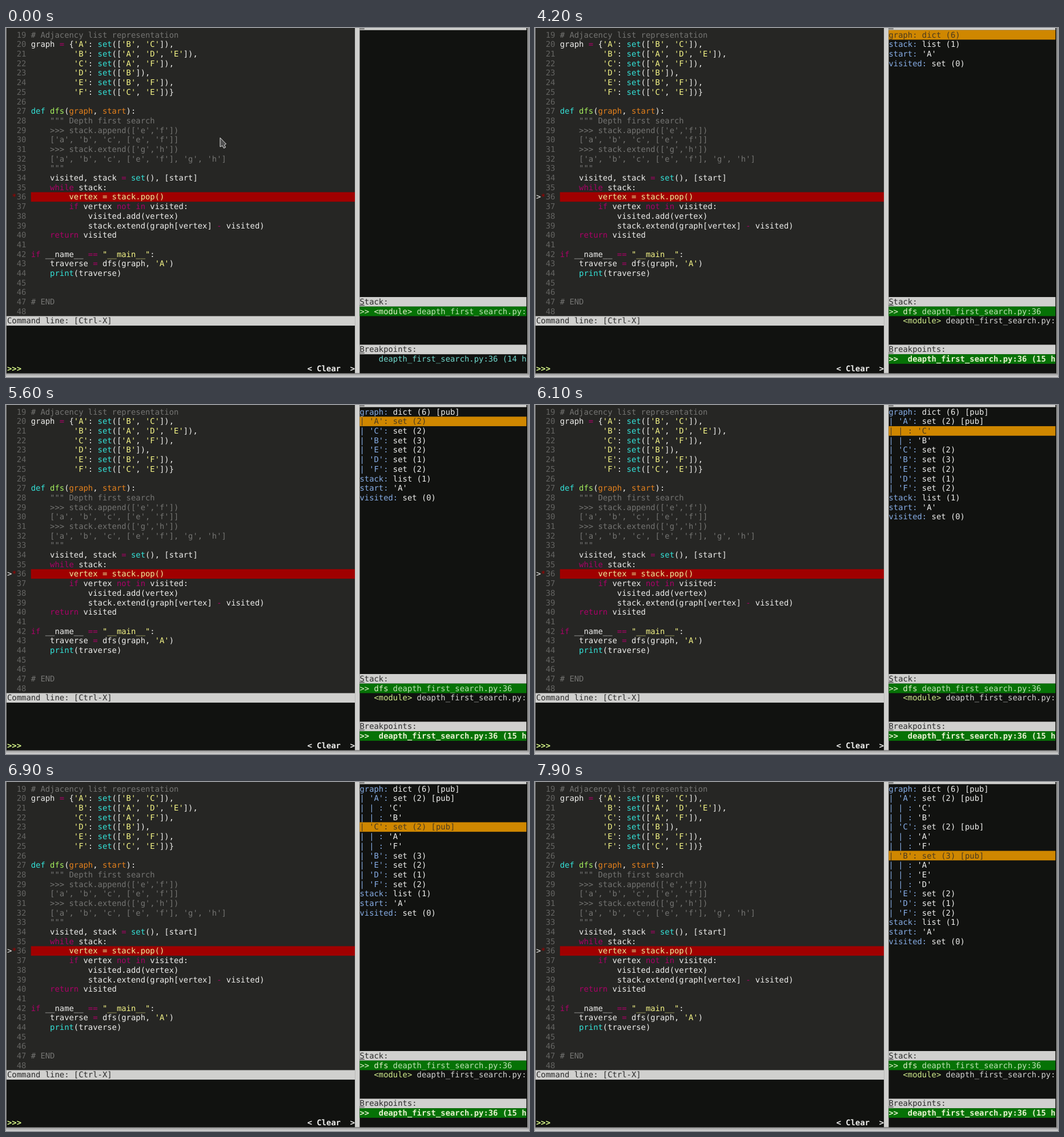
These frames come from a looping animation (916x611 px, 8000 ms). An HTML page:

```html
<!DOCTYPE html>
<html lang="en">
<head>
<meta charset="utf-8">
<title>Debugger session</title>
<style>
  html, body { margin: 0; width: 100%; height: 100%; overflow: hidden; background: #111210; }
  svg { display: block; width: 916px; height: 611px; }
  text {
    font: 13.86px "DejaVu Sans Mono", "Liberation Mono", monospace;
    text-rendering: geometricPrecision;
    white-space: pre;
  }
  .bold { font-weight: bold; }
</style>
</head>
<body>
<svg id="stage" viewBox="0 0 916 611" xmlns="http://www.w3.org/2000/svg">
  <defs>
    <linearGradient id="edge" x1="0" y1="0" x2="0" y2="1">
      <stop offset="0" stop-color="#8e8e8e"/>
      <stop offset="1" stop-color="#d6d6d6"/>
    </linearGradient>
  </defs>
  <g id="base"></g>
  <g id="live"></g>
  <path id="pointer" d="M375 192V208L379 206L381.5 210.5L384.5 209L382.5 204.5L385.5 203Z"
        fill="#505050" stroke="#dedede" stroke-width="1"/>
</svg>
<script>
const LOOP = 8000;
const CELL_W = 8.344, CELL_H = 16.69, LEFT = 2, TOP = 3.7, BASELINE = 13;
const SIDE = 74, COLS = 109;

const C = {
  code: '#262624', shell: '#111210', bar: '#d0d0ce', ink: '#2a2a2a',
  white: '#eeeeec', comment: '#747472', number: '#646462',
  keyword: '#ac0068', cyan: '#34e2d8', def: '#a4ee5c', param: '#e5811c',
  string: '#f4f486', red: '#a00000', onRed: '#eeee9c', prompt: '#d9f98a',
  green: '#067206', onGreen: '#e8f2d0', dimGreen: '#bfe3b5',
  frame: '#d2ee8e', place: '#d2d2d0', point: '#70d8cc',
  label: '#86ace4', orange: '#cf8700', onOrange: '#4a3a20'
};

const base = document.getElementById('base');
const live = document.getElementById('live');
const pointer = document.getElementById('pointer');

const x = col => LEFT + col * CELL_W;
const y = row => TOP + row * CELL_H;

function add(parent, tag, attrs, content) {
  const el = document.createElementNS('http://www.w3.org/2000/svg', tag);
  for (const key in attrs) el.setAttribute(key, attrs[key]);
  if (content) el.textContent = content;
  parent.appendChild(el);
}

function rect(parent, left, top, right, bottom, fill) {
  add(parent, 'rect', { x: left, y: top, width: right - left, height: bottom - top, fill });
}

function fillCells(parent, col, row, endCol, rows, fill) {
  rect(parent, x(col), y(row), x(endCol), y(row + rows), fill);
}

// Words are placed on the character grid one by one.
function print(parent, col, row, str, fill, bold) {
  for (const word of str.matchAll(/\S+/g)) {
    const attrs = { x: x(col + word.index), y: y(row) + BASELINE, fill };
    if (bold) attrs.class = 'bold';
    add(parent, 'text', attrs, word[0]);
  }
}

function underline(col, row) {
  const top = y(row) + BASELINE + 1;
  rect(base, x(col), top, x(col + 1), top + 1, C.ink);
}

const source = `# Adjacency list representation
graph = {'A': set(['B', 'C']),
         'B': set(['A', 'D', 'E']),
         'C': set(['A', 'F']),
         'D': set(['B']),
         'E': set(['B', 'F']),
         'F': set(['C', 'E'])}

def dfs(graph, start):
    """ Depth first search
    >>> stack.append(['e','f'])
    ['a', 'b', 'c', ['e', 'f']]
    >>> stack.extend(['g','h'])
    ['a', 'b', 'c', ['e', 'f'], 'g', 'h']
    """
    visited, stack = set(), [start]
    while stack:
        vertex = stack.pop()
        if vertex not in visited:
            visited.add(vertex)
            stack.extend(graph[vertex] - visited)
    return visited

if __name__ == "__main__":
    traverse = dfs(graph, 'A')
    print(traverse)


# END
`.split('\n');
const FIRST_LINE = 19, BREAK_ROW = 17, DEF_ROW = 8;
const TOKENS = /'[^']*'|"[^"]*"|\b(?:if|while|return|not|in)\b|==|=|-|\b(?:set|print|def)\b|\w+|[^\w\s'"=-]+/g;

function tokenColor(token, row) {
  if (/^['"]/.test(token)) return C.string;
  if (/^(if|while|return|not|in|==|=|-)$/.test(token)) return C.keyword;
  if (/^(set|print|def)$/.test(token)) return C.cyan;
  if (row === DEF_ROW && token === 'dfs') return C.def;
  if (row === DEF_ROW && /\w/.test(token)) return C.param;
  return C.white;
}

function drawCode() {
  source.forEach((line, row) => {
    print(base, 2, row, String(FIRST_LINE + row), C.number);
    if (row === BREAK_ROW) return;
    const isComment = line[0] === '#' || (row > DEF_ROW && row < 15);
    if (isComment) return print(base, 5, row, line, C.comment);
    for (const token of line.matchAll(TOKENS)) {
      print(base, 5 + token.index, row, token[0], tokenColor(token[0], row));
    }
  });
}

function drawBase() {
  rect(base, 0, 0, 916, 611, C.shell);
  rect(base, 1, 0, x(73), y(30), C.code);
  fillCells(base, 5, BREAK_ROW, 73, 1, C.red);
  print(base, 1, BREAK_ROW, '*', C.red);
  drawCode();

  rect(base, x(73), 0, x(SIDE), y(36), C.bar);
  rect(base, x(SIDE), 0, x(COLS), TOP, C.bar);
  underline(SIDE, -1);
  rect(base, 1, y(30), x(73), y(31), C.bar);
  print(base, 0, 30, 'Command line: [Ctrl-X]', C.ink);
  print(base, 0, 35, '>>>', C.prompt, true);
  print(base, 63, 35, '< Clear  >', C.white, true);

  for (const [row, title] of [[28, 'Stack:'], [33, 'Breakpoints:']]) {
    fillCells(base, SIDE, row, COLS, 1, C.bar);
    print(base, SIDE, row, title, C.ink);
    underline(SIDE, row);
  }

  rect(base, 0, 0, 1, 611, '#8a8a8a');
  rect(base, 913, 0, 916, 611, '#8e8e8e');
  rect(base, 0, y(36), 916, 611, 'url(#edge)');
}

// Time, selected variable row, number of opened tree nodes.
const steps = [
  [0, -1, 0], [1100, -1, 0], [4200, 0, 0], [5200, 0, 1], [5600, 1, 1],
  [5900, 1, 2], [6100, 2, 2], [6400, 3, 2], [6600, 4, 2], [6900, 4, 3],
  [7200, 5, 3], [7400, 6, 3], [7600, 7, 3], [7900, 7, 4]
];
const sets = { A: 'CB', C: 'AF', B: 'AED', E: 'BF', D: 'B', F: 'CE' };

function variables(opened) {
  const pub = isOpen => isOpen ? ' [pub]' : '';
  const rows = [['graph:', 'dict (6)' + pub(opened > 0)]];
  if (opened) {
    Object.entries(sets).forEach(([key, items], i) => {
      const isOpen = i < opened - 1;
      rows.push([`| '${key}':`, `set (${items.length})` + pub(isOpen)]);
      if (isOpen) for (const item of items) rows.push(['| | :', `'${item}'`]);
    });
  }
  return rows.concat([['stack:', 'list (1)'], ['start:', "'A'"], ['visited:', 'set (0)']]);
}

function drawVariables(selected, opened) {
  variables(opened).forEach(([label, value], row) => {
    const on = row === selected;
    if (on) fillCells(live, SIDE, row, COLS, 1, C.orange);
    print(live, SIDE, row, label, on ? C.onOrange : C.label);
    print(live, SIDE + label.length + 1, row, value, on ? C.onOrange : C.white);
  });
}

function drawStep(index) {
  const [, selected, opened] = steps[index];
  const stopped = index > 0;
  live.replaceChildren();

  print(live, 13, BREAK_ROW, 'vertex = stack.pop()', C.onRed, index === 1);
  fillCells(live, SIDE, 29, COLS, 1, C.green);

  if (!stopped) {
    print(live, SIDE, 29, '>> <module>', C.onGreen);
    print(live, SIDE + 12, 29, 'deapth_first_search.py:', C.dimGreen);
    print(live, SIDE + 4, 34, 'deapth_first_search.py:36 (14 h', C.point);
    return;
  }
  print(live, 0, BREAK_ROW, '>', C.white);
  print(live, SIDE, 29, '>> dfs', C.onGreen);
  print(live, SIDE + 7, 29, 'deapth_first_search.py:36', C.dimGreen);
  print(live, SIDE + 3, 30, '<module>', C.frame);
  print(live, SIDE + 12, 30, 'deapth_first_search.py:', C.place);
  fillCells(live, SIDE, 34, COLS, 1, C.green);
  print(live, SIDE, 34, '>>  deapth_first_search.py:36 (15 h', C.onGreen, true);
  drawVariables(selected, opened);
}

let shown = -1;
function render(t) {
  const index = steps.findLastIndex(step => step[0] <= t);
  if (index !== shown) drawStep(shown = index);
  pointer.style.display = t < 100 ? '' : 'none';
}

const start = performance.now();
function tick() {
  render((performance.now() - start) % LOOP);
  requestAnimationFrame(tick);
}

drawBase();
render(0);
requestAnimationFrame(tick);
</script>
</body>
</html>
```
